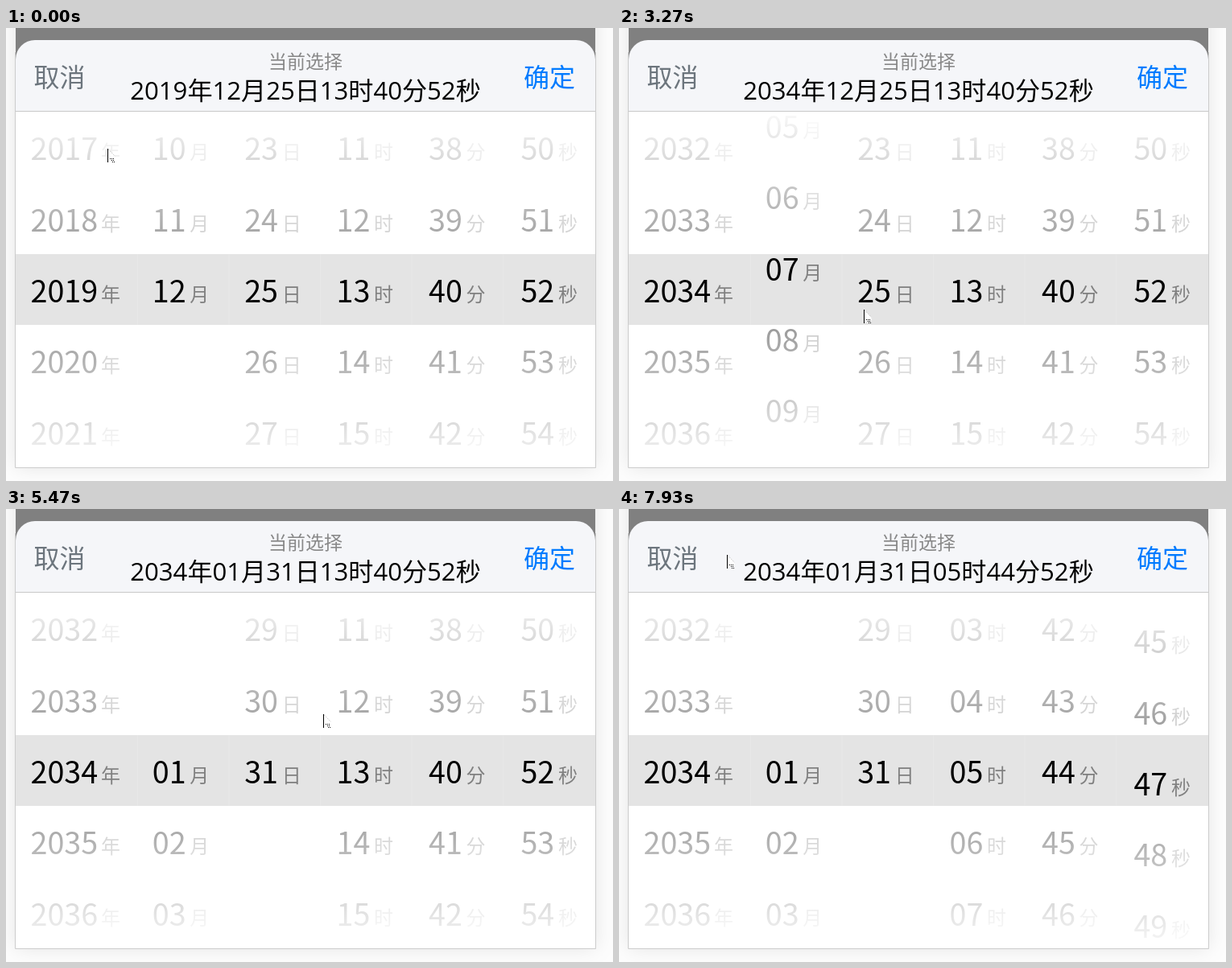
An HTML page that plays this animation: 754 px wide and 563 px high, repeating every 8000 ms.

```html
<!DOCTYPE html>
<html lang="zh-CN">
<head>
<meta charset="utf-8">
<title>日期时间选择</title>
<style>
html, body { margin: 0; width: 100%; height: 100%; overflow: hidden; background: #fdfdfd; }
svg { display: block; }
text { font-family: "Noto Sans CJK SC", "Noto Sans", sans-serif; white-space: pre; }
.phone { fill: #808080; filter: drop-shadow(0 0 12px rgba(0, 0, 0, .1)); }
.frame { fill: none; stroke: #ccc; }
.btn { font-size: 32px; }
.hint { font-size: 23px; fill: #888; text-anchor: middle; }
.now { font: 31.1px "Open Sans", "Noto Sans CJK SC", sans-serif; text-anchor: middle; }
.num { font-size: 37.7px; }
.unit { font-size: 24px; fill: #808080; }
</style>
</head>
<body>
<svg width="754" height="563" viewBox="0 0 754 563">
  <defs>
    <linearGradient id="fade" x2="0" y2="1">
      <stop offset="0" stop-color="#fff" stop-opacity=".98"/>
      <stop offset="1" stop-color="#fff" stop-opacity=".6"/>
    </linearGradient>
    <clipPath id="body"><rect x="12" y="104" width="720" height="442"/></clipPath>
  </defs>
  <rect class="phone" x="12" y="-80" width="720" height="626"/>
  <rect x="12" y="15" width="720" height="140" rx="24" fill="#f5f6f9"/>
  <rect x="12" y="104" width="720" height="442" fill="#fff"/>
  <path d="M12 103.500H732" stroke="#c8c8c8"/>
  <text class="btn" x="34.5" y="73" fill="#6c757d">取消</text>
  <text class="btn" x="643" y="73" fill="#007bff">确定</text>
  <text class="hint" x="372" y="49.500">当前选择</text>
  <text class="now" id="now" x="372" y="88.500"></text>
  <rect x="12" y="281" width="720" height="88" fill="#e4e4e4"/>
  <path d="M163 325H619" stroke="#e8e8e8" stroke-width="88" stroke-dasharray="1 112.500"/>
  <g id="wheels" clip-path="url(#body)"></g>
  <rect x="12" y="104" width="720" height="177" fill="url(#fade)"/>
  <rect x="12" y="104" width="720" height="177" fill="url(#fade)" transform="matrix(1 0 0 -1 0 650)"/>
  <path class="frame" d="M11.500 30V546.500H732.500V30"/>
  <g id="cursor">
    <path d="M.5 0V17L4 13.500H9.500V9.500Z" fill="#fff"/>
    <path d="M1 .5L9.500 9.500" stroke="#ccc" stroke-dasharray="2 1" fill="none"/>
    <path d="M.5 0V17" stroke="#000"/>
    <path d="M3 12.500H9M5 14.500H9M6 16.500H9" stroke="#000" stroke-dasharray="1 1"/>
  </g>
</svg>
<script>
const LOOP = 8000, FPMS = .015, SPIN = 800;
const ROW = 88.3, BASE = 341;
const $ = id => document.getElementById(id);
const pad = v => String(v).padStart(2, '0');
const ease = u => u * u * (3 - 2 * u);
const clamp = u => Math.min(1, Math.max(0, u));
const mix = (a, b, u) => a + (b - a) * u;

// Each wheel spins once, at "start"; the title takes the new value at "shown"
const wheels = [
  { unit: '年', min: 1900, max: 2100, from: 2019, to: 2034, start: 2147, shown: 3000 },
  { unit: '月', min: 1, max: 12, from: 12, to: 1, start: 2906, shown: 3730 },
  { unit: '日', min: 1, max: 31, from: 25, to: 31, start: 3721, shown: 4600 },
  { unit: '时', min: 0, max: 23, from: 13, to: 5, start: 5515, shown: 6130 },
  { unit: '分', min: 0, max: 59, from: 40, to: 44, start: 6430, shown: 7400 },
  { unit: '秒', min: 0, max: 59, from: 52, to: 46, start: 7317, shown: LOOP }
];

// Places the pointer visits: ms, x, y
const stops = [
  [0, 126, 150], [470, 234, 258], [870, 126, 124], [930, 82, 72], [1400, 424, 90],
  [2070, 60, 290], [2270, 56, 205], [2800, 200, 190], [3270, 304, 350], [4400, 462, 393],
  [4870, 518, 426], [5470, 394, 255], [6200, 558, 431], [7330, 662, 277],
  [7600, 668, 390], [7930, 134, 57]
];

function addText(cls, x) {
  const el = document.createElementNS('http://www.w3.org/2000/svg', 'text');
  el.setAttribute('class', cls);
  el.setAttribute('x', x);
  return $('wheels').appendChild(el);
}

wheels.forEach((w, i) => {
  const x = i ? 67.4 + 114.4 * i : 30.5;
  const unitX = x + (i ? 46.5 : 87.5);
  w.rows = Array.from({ length: 7 }, () => [addText('num', x), addText('unit', unitX)]);
});

function drawWheel(w, t) {
  const pos = mix(w.from, w.to, ease(clamp((t - w.start) / SPIN)));
  const first = Math.round(pos) - 3;
  w.rows.forEach(([num, unit], i) => {
    const v = first + i, on = v >= w.min && v <= w.max;
    const y = BASE + (v - pos) * ROW;
    num.setAttribute('y', y);
    unit.setAttribute('y', y - 1);
    num.textContent = on ? pad(v) : '';
    unit.textContent = on ? w.unit : '';
  });
}

function drawCursor(t) {
  const i = Math.max(1, stops.findIndex(s => s[0] >= t));
  const [t0, x0, y0] = stops[i - 1], [t1, x1, y1] = stops[i];
  const u = ease(clamp((t - t0) / (t1 - t0)));
  const x = Math.round(mix(x0, x1, u)), y = Math.round(mix(y0, y1, u));
  $('cursor').setAttribute('transform', `translate(${x} ${y})`);
}

function draw(now) {
  const t = Math.min(7930, Math.floor(now % LOOP * FPMS + .06) / FPMS);
  wheels.forEach(w => drawWheel(w, t));
  $('now').textContent = wheels.map(w => pad(t < w.shown ? w.from : w.to) + w.unit).join('');
  drawCursor(t);
}

const begin = performance.now();
function tick() {
  draw(performance.now() - begin);
  requestAnimationFrame(tick);
}
tick();
</script>
</body>
</html>
```
